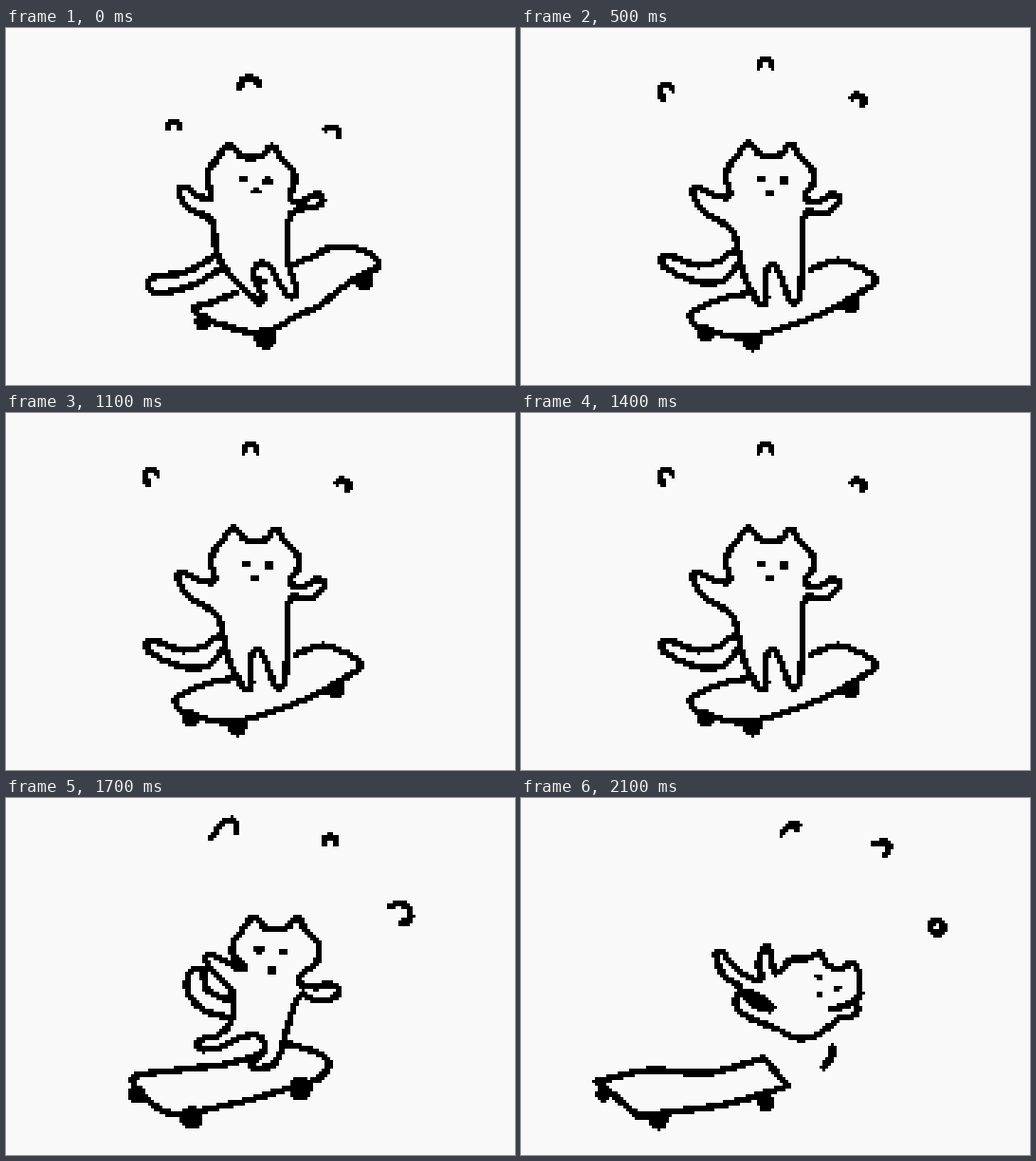
Write an HTML page with a canvas that moves like this. It is 537x376 px and loops after 2200 ms.

```html
<!DOCTYPE html>
<html lang="en">
<head>
<meta charset="utf-8">
<title>Skateboarding cat</title>
<style>
html, body { margin: 0; width: 100%; height: 100%; overflow: hidden; background: #f9f9f9; }
canvas { display: block; }
</style>
</head>
<body>
<canvas id="stage" width="537" height="376"></canvas>
<script>
const W = 537, H = 376, CELL = 3, PEN = 7, LOOP = 2200;
const PAPER = 249, paper = `rgb(${PAPER},${PAPER},${PAPER})`, ink = '#000';
const screen = document.getElementById('stage').getContext('2d');
const small = document.createElement('canvas');
small.width = Math.ceil(W / CELL);
small.height = Math.ceil(H / CELL);
const ctx = small.getContext('2d', { willReadFrequently: true });

// Shape helpers return flat lists of coordinates
const arc = (x, y, r, from, to, steps = 6) => Array.from({ length: steps + 1 }, (_, i) => {
  const a = (from + (to - from) * i / steps) * Math.PI / 180;
  return [x + r * Math.cos(a), y + r * Math.sin(a)];
}).flat();
const shift = (flat, dx, dy) => flat.map((v, i) => v + (i % 2 ? dy : dx));
const blend = (a, b, k) => a.map((v, i) => Array.isArray(v) ? blend(v, b[i], k) : v + (b[i] - v) * k);

// Rounded end of a limb that points towards deg and ends at x, y
function tip(x, y, r, deg) {
  const a = deg * Math.PI / 180;
  return arc(x - r * Math.cos(a), y - r * Math.sin(a), r, deg - 90, deg + 90, 2);
}

// Head from the left cheek over both ears to the right cheek
const head = (x, y) => shift(
  [-46,4, -45,-10, -36,-22, -23,-37, -11,-25, 11,-25, 22,-36, 31,-22, 44,-10, 45,6], x, y);
const face = (x, y, noseX, noseY, noseH = 8) =>
  [[x, y, 9, 8], [x + 25, y + 2, 9, 8], [x + noseX, y + noseY, 9, noseH]];

const crouch = {
  body: [...head(259, 160), 299,178, 311,183, ...tip(334, 179, 6, -20), 302,194, 297,225, 298,248,
    ...tip(302, 283, 6, 75), 285,262, 277,250, 267,248, 261,257, 264,269, ...tip(271, 289, 4, 55),
    235,258, 222,236, 217,203, 195,191, ...tip(185, 167, 6, 240), 205,178, 217,178],
  tail: [[229,252, 195,272, ...tip(150, 271, 9, 175), 188,258, 221,239]],
  knee: [263,264, 273,268],
  face: face(251, 159, 13, 13, 6)
};
const stand = {
  body: [...head(263, 158), 300,178, 312,183, ...tip(336, 179, 6, -20), 322,195, 300,196, 297,240,
    ...tip(287, 290, 6, 100), 274,262, 266,249, 259,256, 258,272, ...tip(255, 292, 5, 80),
    233,255, 223,214, 193,193, ...tip(184, 168, 6, 240), 207,177, 220,177],
  tail: [[230,248, 212,267, 185,267, ...tip(149, 242, 7, 215), 185,250, 208,246, 226,233]],
  face: face(253, 159, 10, 15)
};
const lean = {
  body: [...head(285, 162), 326,175, 311,187, 310,195, 325,199, ...tip(351, 204, 8, 0), 325,213, 311,207,
    298,238, 284,279, ...tip(259, 279, 5, 190), 272,268, 268,251, 248,252, 228,262,
    ...tip(202, 258, 6, 190), 222,251, 236,238, 239,205, 222,187, ...tip(212, 165, 6, 230), 233,173, 252,179],
  tail: [[211,181, 198,180, 191,192, 193,208, 210,224, 234,231], [208,186, 213,203, 236,213]],
  face: face(267, 160, 14, 21)
};
const dive = {
  body: [232,199, 215,189, ...tip(210, 161, 5, 265), 230,182, 246,191, 254,190, 250,176,
    ...tip(261, 157, 4, 300), 265,176, 269,185, 285,170, 300,170, 316,163, 321,174, 335,180, 352,175,
    358,207, 352,214, 356,223, 348,231, 338,231, 315,248, 293,254, 270,243, 240,231, 228,221, 227,209],
  tail: [],
  knee: [328,222, 338,220, 350,216],
  patch: [250, 214, 21, 9, 0.5],
  face: [[314, 188, 8, 5], [334, 200, 8, 6], [315, 207, 6, 5]]
};

// Boards: [deck outlines, wheels as x, y, r]
const high = [
  [[242,279, 215,290, 198,297, 232,314, 272,321, 305,304, 330,293, 350,277, 372,262, 393,249, 376,234, 345,231, 325,240, 300,250]],
  [[208,310,9], [274,326,12], [378,268,9]]
];
const mid = [
  [[236,280, 212,285, 188,295, 178,304, 195,318, 240,325, 320,300, 372,270, 372,261, 335,245, 306,254]],
  [[195,322,9], [244,331,10], [348,291,10]]
];
const low = [
  [[270,270, 228,281, 150,290, 133,298, 165,329, 195,332, 322,299, 340,284, 335,272, 310,262, 291,258]],
  [[138,312,9], [196,337,12], [311,306,12]]
];
const loose = [
  [[80,298, 140,286, 195,290, 256,274], [256,274, 282,303], [282,303, 215,323, 124,335], [124,335, 80,298]],
  [[87,312,8], [145,340,10], [259,321,9]]
];

const near = [arc(177, 104, 6, 170, 360), arc(257, 62, 10, 170, 350), arc(343, 112, 8, 220, 380)];
const wide = [arc(153, 67, 7, 110, 340), arc(258, 40, 7, 170, 370), arc(355, 77, 7, 210, 390)];
const side = [[217,42, 226,29, 238,22, 243,29, 243,37], arc(342, 46, 6, 170, 370),
  [405,114, 418,111, 427,120, 424,130, 416,131]];
const falling = [[275,38, 283,29, 292,28, 291,34], [371,49, 384,46, 389,52, 384,60],
  arc(439, 136, 7, 110, 430), [329,262, 328,272, 319,284]];
const spread = k => [shift(wide[0], -17 * k, -18 * k), shift(wide[1], 0, -15 * k), shift(wide[2], 14 * k, -14 * k)];

// A pose may move the cat by dx, dy and turn it
const pose = (cat, board, marks, dx = 0, dy = 0, turn = 0) => ({ cat, board, marks, dx, dy, turn });
const right = pose(crouch, high, near);
const middle = pose(stand, mid, wide);
const left = pose(stand, blend(mid, low, 0.5), spread(1), 5);
const slip = pose(stand, low, spread(0.5), 8);
const hop = pose(lean, low, side);
const leap = pose(dive, loose, falling, 7, -16, -12);
const fall = pose(dive, loose, falling);

const timeline = [
  [0, right], [200, middle], [400, left], [500, middle], [700, right], [800, middle],
  [1000, left], [1100, middle], [1300, right], [1400, middle], [1600, slip],
  [1700, hop], [1900, leap], [2100, fall]
];

// Smooth path through the points, tangents scaled to each span
function trace(flat, closed) {
  const p = [];
  for (let i = 0; i < flat.length; i += 2) p.push([flat[i], flat[i + 1]]);
  const n = p.length;
  const at = i => closed ? p[(i + n) % n] : p[Math.max(0, Math.min(n - 1, i))];
  const handle = (i, len) => {
    const [a, b] = [at(i - 1), at(i + 1)];
    const k = len / 3 / (Math.hypot(b[0] - a[0], b[1] - a[1]) || 1);
    return [(b[0] - a[0]) * k, (b[1] - a[1]) * k];
  };
  ctx.beginPath();
  ctx.moveTo(...p[0]);
  for (let i = 0; i < (closed ? n : n - 1); i++) {
    const [x, y] = at(i), [u, v] = at(i + 1), len = Math.hypot(u - x, v - y);
    const [a, b] = handle(i, len), [c, d] = handle(i + 1, len);
    ctx.bezierCurveTo(x + a, y + b, u - c, v - d, u, v);
  }
  if (closed) ctx.closePath();
}

function line(flat) {
  trace(flat);
  ctx.stroke();
}

function blob(x, y, rx, ry = rx, turn = 0) {
  ctx.beginPath();
  ctx.ellipse(x, y, rx, ry, turn, 0, 2 * Math.PI);
  ctx.fill();
}

function drawCat({ body, tail, knee, patch, face }) {
  tail.forEach(line);
  trace(body, true);
  ctx.fillStyle = paper;
  ctx.fill();
  ctx.stroke();
  ctx.fillStyle = ink;
  if (knee) line(knee);
  if (patch) blob(...patch);
  for (const [x, y, w, h] of face) ctx.fillRect(x - w / 2, y - h / 2, w, h);
}

// Turn the small drawing into hard two-colour cells and enlarge it
function pixelate() {
  const img = ctx.getImageData(0, 0, small.width, small.height), d = img.data;
  for (let i = 0; i < d.length; i += 4) d[i] = d[i + 1] = d[i + 2] = d[i] < 130 ? 0 : PAPER;
  ctx.putImageData(img, 0, 0);
  screen.imageSmoothingEnabled = false;
  screen.drawImage(small, 0, 0, small.width * CELL, small.height * CELL);
}

function draw({ cat, board: [deck, wheels], marks, dx, dy, turn }) {
  ctx.setTransform(1 / CELL, 0, 0, 1 / CELL, 0, 0);
  ctx.fillStyle = paper;
  ctx.fillRect(0, 0, W + CELL, H + CELL);
  ctx.fillStyle = ctx.strokeStyle = ink;
  ctx.lineWidth = PEN;
  ctx.lineCap = ctx.lineJoin = 'round';
  marks.forEach(line);
  deck.forEach(line);
  wheels.forEach(w => blob(...w));
  ctx.translate(285 + dx, 210 + dy);
  ctx.rotate(turn * Math.PI / 180);
  ctx.translate(-285, -210);
  drawCat(cat);
  pixelate();
}

const begin = performance.now();
let shown;
function tick() {
  const t = (performance.now() - begin) % LOOP;
  const next = timeline.filter(([start]) => start <= t).pop()[1];
  if (next !== shown) draw(shown = next);
  requestAnimationFrame(tick);
}
tick();
</script>
</body>
</html>
```
